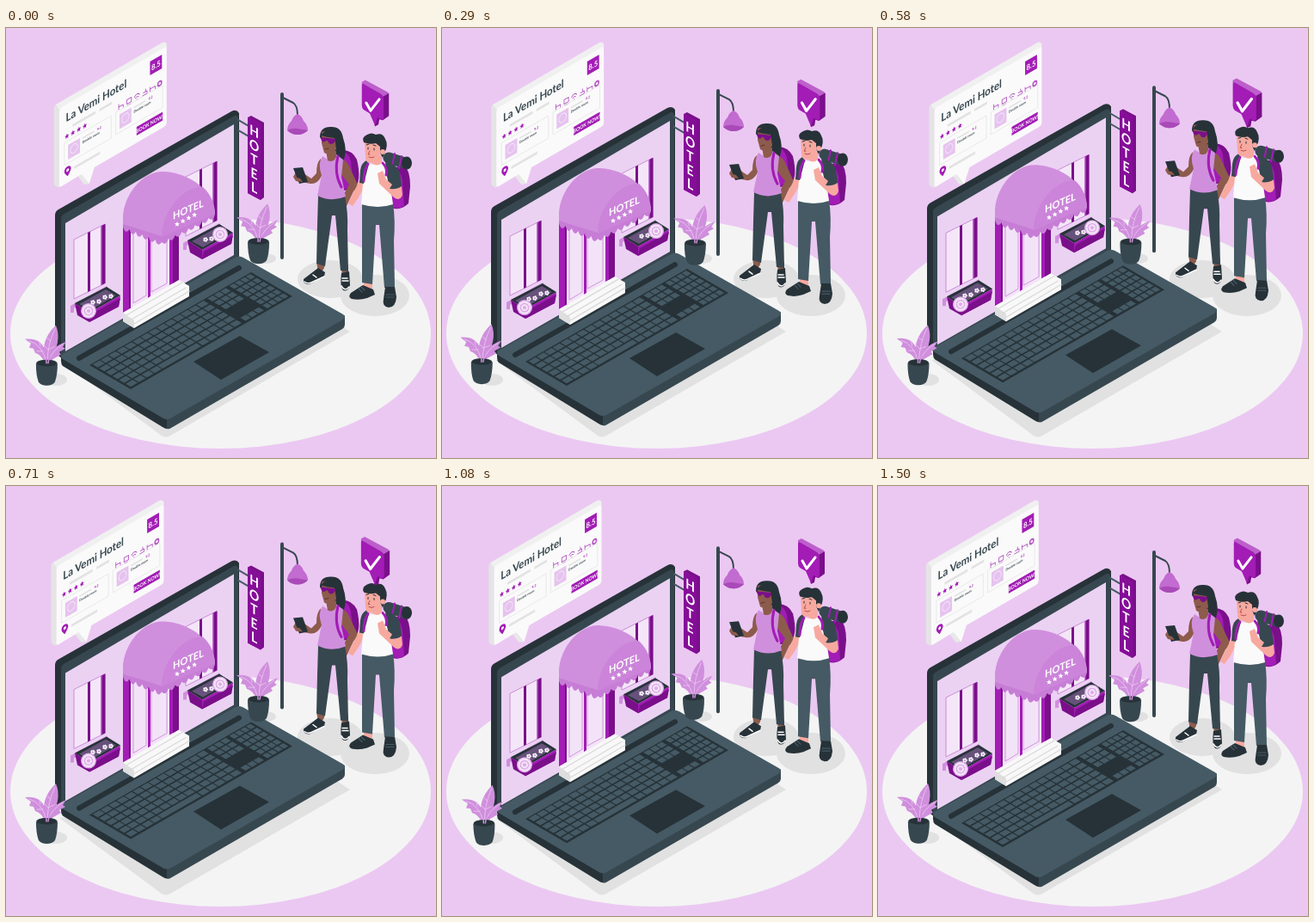
An HTML page that plays this animation: 500 by 500 pixels, repeating every 1.54 s.

```html
<!DOCTYPE html>
<html lang="en">
<head>
<meta charset="utf-8">
<title>Hotel booking</title>
<style>
  html, body { margin: 0; width: 100%; height: 100%; overflow: hidden; background: #ebc8f2; }
  svg { display: block; width: 100%; height: 100%; }
  text { font-family: Lato, sans-serif; font-weight: 700; }
  .ink { fill: #263238; } .slate { fill: #37474f; } .steel { fill: #455a64; }
  .main { fill: #a21cb5; } .deep { fill: #7a0f8a; } .lilac { fill: #d08fdd; }
  .white { fill: #fafafa; } .shade { fill: #e1e1e1; }
  .brown { fill: #8d5b4c; } .pink { fill: #f7a9a0; }
  .line { fill: none; stroke-linecap: round; stroke-linejoin: round; }
</style>
</head>
<body>
<svg viewBox="0 0 500 500">
  <defs>
    <g id="plant">
      <path class="lilac" d="M46 390Q38 365 58 346Q66 364 50 390ZM46 390Q40 379 34 378L32 373L27 372L29 367L22 362Q40 360 45 374Q48 381 48 390ZM48 390Q50 372 70 365L66 371L69 373L62 377L64 380L57 384Q52 386 51 391Z"/>
      <path class="line" stroke="#ecc9f2" stroke-width=".8" d="M48 388Q49 366 57 350M47 388Q42 368 27 364M49 388Q53 376 66 368M49 374L44 369M49 374L56 371M52 364L48 361M40 370L39 365M43 376L36 376"/>
      <path class="slate" d="M35 391Q35 386 47.500 386T60 391Q60 404 57 412Q54 416 47.500 416T38 412Q35 404 35 391Z"/>
      <ellipse class="ink" cx="47.500" cy="390" rx="11.500" ry="3.600"/>
      <path class="line" stroke="#d08fdd" stroke-width="1.500" d="M47 390V380M49 390L51 380"/>
    </g>
    <g id="box">
      <path class="lilac" d="M75 323L117 300L119 303L79 326V331H75Z"/>
      <path class="ink" d="M80 320L117 301L133 311L97 331Z"/>
      <path class="deep" d="M80 320L97 331V342L83 334Z"/>
      <path class="main" d="M97 331L133 311L131 324L97 342Z"/>
      <path class="deep" d="M99 333L133 314L131 324L97 342Z"/>
      <path fill="#66527a" d="M85 321l31-17l12 7l-30 17Z"/>
      <g id="flowers"></g>
    </g>
    <g id="ball">
      <circle r="9" fill="#dcaee6"/>
      <circle class="line" r="6.500" stroke="#f6e4fa" stroke-width="2.400" stroke-dasharray="1.500 2"/>
      <circle class="line" r="3" stroke="#f6e4fa" stroke-width="2" stroke-dasharray="1.500 1.500"/>
    </g>
    <path id="star" d="M0-3L.9-1L3-.9L1.400.5L1.900 2.700L0 1.500L-1.900 2.700L-1.400.5L-3-.9L-.9-1Z"/>
  </defs>

  <ellipse cx="249.500" cy="355" rx="244.500" ry="134" fill="#f4f4f4"/>
  <g class="shade">
    <ellipse cx="377" cy="292" rx="38" ry="22"/>
    <ellipse cx="429" cy="311" rx="40" ry="24"/>
    <path d="M62 386L181 474Q186 477 191 474L400 353L380 340Z"/>
    <ellipse cx="58" cy="409" rx="13" ry="7"/>
    <ellipse cx="302" cy="268" rx="12" ry="6"/>
  </g>

  <g id="float">
    <!-- lamp -->
    <path class="line" stroke="#37474f" stroke-width="2" d="M322 81L334 87Q339 90 339 102"/>
    <path class="line" stroke="#37474f" stroke-width="4" d="M321 77V267"/>
    <path fill="#c26bd0" d="M339 100Q344 102 346 108Q351 113 351 119Q346 124 339 124T327 119Q327 113 332 108Q334 102 339 100Z"/>
    <path fill="#a94ab8" d="M327 119Q333 116 339 117T351 119Q346 124 339 124T327 119Z"/>

    <!-- laptop -->
    <path class="ink" d="M57 378V218Q57 213 61 211L262 97Q268 94 271 99V268L66 385Z"/>
    <path class="slate" d="M64 382V222Q64 218 68 216L264 103Q269 100 270 105V268L66 384Z"/>
    <path fill="#ebd2f3" d="M69 227L265 112V264L69 376Z"/>
    <path class="ink" d="M64 381L187 452V466Q185 466 182 464L66 393Q64 391 64 387Z"/>
    <path class="slate" d="M187 452L394 334V345Q394 348 391 350L192 465Q189 467 187 466Z"/>
    <path class="steel" d="M66 379L266 267Q271 264 276 267L392 333Q396 336 392 339L191 454Q187 456 183 454L66 385Q62 382 66 379Z"/>
    <path class="line" stroke="#263238" stroke-width="6" d="M85 384L271 279"/>
    <g id="keys" class="steel" transform="matrix(1.880 -1.080 .48 .28 97 392)"><path class="ink" d="M0 0H100V100H0Z"/></g>
    <path class="ink" d="M218 388L272 358L306 377L250 409Z"/>

    <!-- windows -->
    <g id="windows"></g>
    <use href="#box"/>
    <use href="#box" x="131" y="-73"/>
    <use href="#ball" x="96" y="329"/>
    <use href="#ball" x="249" y="240"/>

    <!-- entrance -->
    <path fill="#f3e3f8" d="M145 225H191V299L145 326Z"/>
    <path class="line" stroke="#c783d4" stroke-width=".8" d="M148 230V320L163 311V230M169 230V307L187 297V230"/>
    <path class="main" d="M165 235H168V312L165 314ZM136 226H145V326L136 331ZM190 230H201V293L190 299Z"/>
    <path class="deep" d="M143 230H145V326L143 327ZM194 230H201V293L194 297Z"/>
    <path fill="#f8f8f8" d="M136 331L201 293L213 300V312L149 349L136 341Z"/>
    <path fill="#dedede" d="M136 331L149 340V349L136 341Z"/>
    <path class="line" stroke="#d9d9d9" stroke-width="1.200" d="M140 334L205 296M144 340L209 302M149 344L213 306"/>
    <path id="awning" fill="#c77dd6"/>
    <path class="lilac" d="M136 228V220C137 193 160 165 184 167C215 169 242 190 243 216L181 242Z"/>
    <path fill="#cb84d9" d="M181 243C180 216 205 183 229 185C238 193 243 205 243 216Z"/>
    <text transform="matrix(.92 -.4 0 1 194 223)" font-size="12" fill="#fff">HOTEL</text>
    <g id="awningStars" fill="#fff"></g>

    <!-- hanging sign -->
    <path class="line" stroke="#455a64" stroke-width="2" d="M270 107L282 114M270 119L282 126"/>
    <path class="deep" d="M281 104L285 102L300 110V197L296 200Z"/>
    <path class="main" d="M281 104L296 112V200L281 192Z"/>
    <path fill="#850d98" d="M281 104L296 112V200L281 192Z"/>
    <g id="sign" fill="#fff" font-size="16" text-anchor="middle"></g>

    <!-- woman -->
    <path class="deep" d="M385 143Q401 139 408 153Q414 178 405 186L390 190Z"/>
    <path class="main" d="M387 143Q398 142 401 155L404 182L391 189Z"/>
    <path class="ink" d="M365 127Q365 115 377 115Q390 114 392 128Q397 142 393 153Q384 156 379 146Z"/>
    <path class="brown" d="M363 284L361 272H371L370 279L365 287ZM390 276H398V292H391ZM366 152Q361 156 361 169L355 175L346 169L338 166L334 173L338 178L354 181Q362 182 367 172ZM388 154Q396 151 400 163L408 180Q410 185 404 190L396 207L389 206L389 200L399 182L389 169Z"/>
    <path class="slate" d="M363 195L394 195Q398 215 397 235L398 283L389 282L383 218L379 218L371 277L361 274L362 229Z"/>
    <path class="lilac" d="M368 149L376 154L384 147L392 153L390 173L395 196Q378 203 362 195L367 171Q362 158 368 149Z"/>
    <path class="brown" d="M372 143H384V150Q381 157 374 154ZM367 121Q375 118 383 124L384 141Q377 150 370 145L367 134Z"/>
    <path class="ink" d="M366 125Q372 116 384 120L392 130L390 149Q384 147 384 139L382 128Q373 127 366 125Z"/>
    <path class="deep" d="M366 127L383 129V131L381 134Q376 137 374 131H372Q370 134 367 131Z"/>
    <path class="line" stroke="#5d332b" d="M371 141L375 140"/>
    <path class="line" stroke="#a21cb5" stroke-width="3" d="M386 149Q381 169 390 185"/>
    <path class="ink" d="M334 163L345 162L351 179L341 181Z"/>
    <path class="brown" d="M334 173L342 175L345 179L337 178Z"/>
    <path class="ink" d="M363 279L371 284L370 289L353 298Q345 298 346 292ZM390 285L399 283L400 299Q398 307 392 305Q388 301 390 285Z"/>
    <path class="line" stroke="#fff" stroke-width="1.500" d="M347 295Q351 298 355 296L370 289M357 287L361 290M390 300Q394 307 399 301M391 291H397M391 294H398"/>

    <!-- man -->
    <path class="deep" d="M447 164L463 159Q470 166 470 184L468 204Q458 213 449 209Z"/>
    <path class="main" d="M447 164Q458 161 461 177L463 207Q455 212 448 207Z"/>
    <path class="line" stroke="#37474f" stroke-width="13" d="M445 151L464 157"/>
    <ellipse class="ink" cx="466" cy="157" rx="6" ry="7.500"/>
    <path class="line" stroke="#a21cb5" stroke-width="2" d="M452 146L449 160M460 149L457 163"/>
    <path class="pink" d="M414 172L421 176L410 197L403 207L398 204L403 193ZM416 294H426V304L416 306ZM441 296H451V307L441 308Z"/>
    <path class="steel" d="M414 204L450 204Q453 224 451 247L452 301L440 302L434 229L430 229L426 298L414 296L414 250Z"/>
    <path class="white" d="M418 155L426 159L438 155L449 161L447 184L450 205Q433 211 413 205L415 181Q411 163 418 155Z"/>
    <path class="slate" d="M419 154Q413 157 412 166L411 180L416 181L422 158ZM441 155Q455 158 458 169L460 184Q454 189 446 187L442 168Z"/>
    <path class="pink" d="M446 187Q454 188 460 184L461 194Q458 202 451 197L434 181L432 169L438 166L442 176L449 182Z"/>
    <path class="line" stroke="#a21cb5" stroke-width="3" d="M438 157Q444 163 442 171M421 158Q416 165 416 178"/>
    <path class="pink" d="M426 148H437V157Q431 162 426 157ZM417 132Q428 126 438 135L439 143Q437 147 435 147Q433 157 426 157Q418 157 418 151Z"/>
    <path class="ink" d="M416 133Q413 127 420 124Q425 121 430 124Q438 121 441 129Q445 136 440 146L438 151L435 145V138L430 134Q423 136 416 133Z"/>
    <circle class="pink" cx="438" cy="144" r="3"/>
    <path class="line" stroke="#263238" d="M421 139V141M428 140V142M419 136L422 135M427 136L430 137"/>
    <path class="line" stroke="#b74c4c" d="M423 143L421 147L423 147M422 150Q425 152 428 150"/>
    <path class="ink" d="M415 299L427 304L429 310L420 314Q411 317 402 315Q397 313 401 308ZM441 301L452 301L454 313Q453 325 445 325Q437 324 439 315Z"/>
    <path class="line" stroke="#455a64" stroke-width="1.200" d="M410 303L414 307M413 301L417 305M442 310H451M442 313H451"/>
  </g>

  <g id="card">
    <path fill="#e4e4e4" d="M56 93Q56 90 58 89L62 94V186L58 184Q56 183 56 181Z"/>
    <path fill="#f0f0f0" d="M58 89L180 18Q184 15 187 18V24L62 95Z"/>
    <path fill="#e8e8e8" d="M82 170L91 182L97 181L103 158Z"/>
    <path class="white" d="M62 97Q62 94 65 92L184 23Q187 21 187 25V110Q187 113 184 115L103 162L97 181L88 170L65 184Q62 186 62 183Z"/>
    <g id="info" transform="matrix(.866 -.5 0 1 62 94)">
      <text x="9" y="20" font-size="13.200" class="slate">La Vemi Hotel</text>
      <path fill="#e2e2e2" d="M18 27H49V30H18ZM54 27H71V30H54ZM20 77H55V80H20Z"/>
      <path class="main" d="M122 6H138V22H122ZM104 73H139V83H104ZM11.500 84Q7 79 7 77A4.500 4.500 0 0 1 16 77Q16 79 11.500 84Z"/>
      <circle class="white" cx="11.500" cy="77" r="1.800"/>
      <g fill="#fff" text-anchor="middle"><text x="130" y="17.500" font-size="9">8.5</text><text x="121.500" y="80.300" font-size="6">BOOK NOW!</text></g>
      <g class="line" stroke="#b455c4" stroke-width="1">
        <path d="M80 35V41M80 38H86V41M91 35H97V40H91ZM92 42H96M101 37Q104.500 33 108 37M102.500 39Q104.500 37 106.500 39M104.500 41V41.500M112 41H118V38H113M116 35V37M122 36V41M122 38H129V41"/>
        <circle cx="135" cy="38" r="2.500" stroke-width="1.800"/>
      </g>
    </g>
  </g>

  <g id="plants"><use href="#plant"/><use href="#plant" x="246" y="-142"/></g>

  <g id="check">
    <path fill="#bd5fcb" d="M414 66V63L418 61L444 75L445 78L438 81Z"/>
    <path class="deep" d="M438 80L445 76V102L438 107L434 106L433 112L429 114L427 104Z"/>
    <path class="main" d="M414 67Q414 64 417 66L436 77Q439 79 439 82V104Q439 107 436 106L432 104L429 113L423 99L416 95Q414 93 414 90Z"/>
    <path class="line" stroke="#fff" stroke-width="3" d="M419 87L424 96L434 83"/>
  </g>
</svg>
<script>
const $ = id => document.getElementById(id);
const add = (id, markup) => $(id).insertAdjacentHTML('beforeend', markup);
const repeat = (n, fn) => Array.from({ length: n }, (_, i) => fn(i)).join('');
const rect = (x, y, w, h, attrs = '') => `<rect x="${x}" y="${y}" width="${w}" height="${h}" ${attrs}/>`;

// keyboard: main block, navigation cluster, number pad
const keyRow = (x, y, n, w) => repeat(n, i => rect(x + i * w + .3, y, w - .6, 12.5));
add('keys', repeat(6, row => {
  const y = 2.5 + row * 16;
  const main = row < 5 ? keyRow(1, y, 14, 4.95)
    : keyRow(1, y, 4, 4.95) + rect(21, y, 24, 12.5) + keyRow(45.5, y, 5, 4.95);
  const nav = row < 3 ? keyRow(72, y, 3, 4) : row > 4 ? keyRow(72, y, 3, 4) : '';
  return main + nav + keyRow(85.5, y, 4, 3.4);
}));

// windows share one shape
add('windows', [[79, 246], [209, 173]].map(([x, y]) => `<g transform="matrix(1 -.5 0 1 ${x} ${y})">
  ${rect(0, 0, 36, 69, 'fill="#f4e6f8" stroke="#c783d4" stroke-width=".8"')}
  ${rect(16, 0, 3, 69, 'class="deep"')}${rect(32, 0, 4.5, 69, 'class="deep"')}
  ${rect(31, 0, 1.5, 69, 'fill="#c26bd0"')}</g>`).join(''));

add('flowers', repeat(4, i => {
  const x = 101 + i * 7, y = 319 - i * 3 + i % 2 * 2;
  return repeat(5, k => `<circle class="white" cx="${x + 1.7 * Math.cos(k * 1.257)}" cy="${y + 1.7 * Math.sin(k * 1.257)}" r="1.2"/>`)
    + `<circle cx="${x}" cy="${y}" r=".9" fill="#d08fdd"/>`;
}));

$('awning').setAttribute('d', 'M136 218V231' + repeat(6, () => 'q3 10 7.5 3') + repeat(8, () => 'q5 5 7.75-4') + 'V214L181 238Z');
add('awningStars', repeat(4, i => `<use href="#star" x="${199 + i * 6.7}" y="${228 - i * 3.6}"/>`));
add('sign', repeat(5, i => `<text transform="matrix(.87 .48 0 1 288.500 ${126 + i * 16.3})">${'HOTEL'[i]}</text>`));

// two offer panels on the card
const panel = (x, y) => rect(x, y, 63, 26, 'fill="none" stroke="#e6e6e6" stroke-width=".8"')
  + rect(x + 5, y + 5, 16, 17, 'fill="#e6c3ee"')
  + `<circle cx="${x + 13}" cy="${y + 13}" r="5" fill="none" stroke="#f3e3f8"/>`
  + rect(x + 24, y + 6, 16, 1.5, 'fill="#dedede"')
  + `<text x="${x + 24}" y="${y + 13}" font-size="4" class="slate">Double room</text>`
  + `<text x="${x + 44}" y="${y + 8}" font-size="4" class="main">9.2</text>`;
add('info', panel(7, 43) + panel(76, 42)
  + repeat(4, i => `<use href="#star" class="main" x="${10.5 + i * 8}" y="37"/>`));

// piecewise linear track of [position, value] stops
const track = (p, stops) => {
  const i = stops.findIndex(s => s[0] > p);
  const [a, from] = stops[i - 1], [b, to] = stops[i];
  return from + (to - from) * (p - a) / (b - a);
};
const shake = [0, -1, 2, -4, 4, -4, 4, -4, 2, -1, 0].map((v, i) => [i / 10, v]);
const beat = [[0, 1], [.14, 1.1], [.28, 1], [.42, 1.1], [.7, 1], [1, 1]];
const sway = [[0, 0], [.25, 1], [.75, -1], [1, 0]];
const move = (id, transform) => $(id).setAttribute('transform', transform);

function draw() {
  const p = (performance.now() % 1540 + 30) / 1500 % 1;
  move('float', `translate(0 ${.4 - 20 * Math.min(p, 1 - p)})`);
  move('card', `translate(${track(p, shake)} 0)`);
  move('check', `translate(429.500 88) scale(${track(p, beat)}) translate(-429.500 -88)`);
  move('plants', `rotate(${track(p, sway)} 169 311)`);
  requestAnimationFrame(draw);
}
draw();
</script>
</body>
</html>
```
